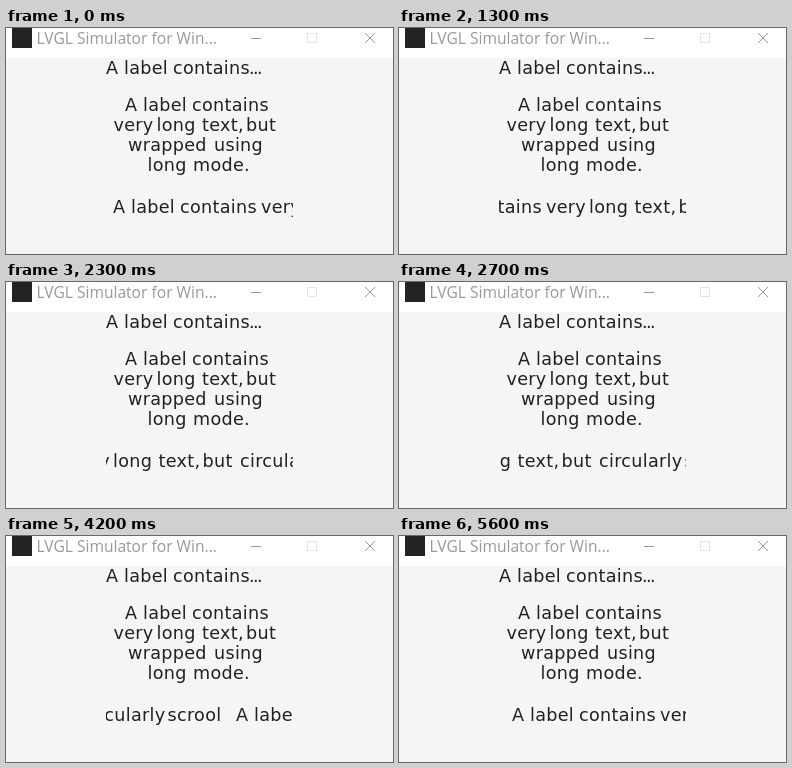
Recreate the animation shown at these times as an HTML page with a canvas. Size 387 by 226 pixels, loop 5.7 s.

```html
<!DOCTYPE html>
<html lang="en">
<head>
<meta charset="utf-8">
<title>Label modes</title>
<style>
html, body { margin: 0; width: 100%; height: 100%; overflow: hidden; background: #f5f5f5; }
canvas { display: block; width: 387px; height: 226px; }
</style>
</head>
<body>
<canvas id="stage" width="387" height="226"></canvas>
<script>
const ctx = document.getElementById('stage').getContext('2d');
const LOOP = 5700, STEP = 100;
const SPEED = 0.0832;  // px per ms
const PERIOD = 472;    // text length including the gap
const INK = '#212121', GREY = '#999';

const intro = [['A', 0], ['label', 19], ['contains', 67]];
const middle = [['very', 0], ['long', 44], ['text,', 88.5], ['but', 133.5]];
const ticker = [
  ...intro,
  ...middle.map(([word, x]) => [word, x + 148]),
  ['circularly', 318], ['scrool', 403.5]
];

// Places a word by the left edge of its ink.
function word(text, x, y) {
  ctx.fillText(text, x + ctx.measureText(text).actualBoundingBoxLeft, y);
}

function line(words, x, y) {
  for (const [text, dx] of words) word(text, x + dx, y);
}

function stroke(color, points) {
  ctx.strokeStyle = color;
  ctx.beginPath();
  for (const [x1, y1, x2, y2] of points) {
    ctx.moveTo(x1, y1);
    ctx.lineTo(x2, y2);
  }
  ctx.stroke();
}

function titleBar() {
  ctx.fillStyle = '#fff';
  ctx.fillRect(0, 0, 387, 30);
  ctx.fillStyle = '#252222';
  ctx.fillRect(6, 0, 20, 20);

  ctx.font = '15.6px "Open Sans", "Noto Sans", sans-serif';
  ctx.letterSpacing = '0px';
  ctx.fillStyle = GREY;
  ctx.fillText('LVGL Simulator for Win...', 30.5, 16);

  ctx.lineWidth = 1;
  stroke(GREY, [[245, 10.5, 255, 10.5]]);
  ctx.strokeStyle = '#e4e4e4';
  ctx.strokeRect(301.5, 5.5, 9, 9);
  stroke(GREY, [[359, 5, 369, 15], [369, 5, 359, 15]]);
}

function labels(shift) {
  ctx.font = '17.6px "DejaVu Sans", sans-serif';
  ctx.fillStyle = INK;
  ctx.letterSpacing = '-1.6px';
  word('...', 244, 46);

  ctx.letterSpacing = '0.3px';
  line(intro, 100, 46);
  line(intro, 119, 83);
  line(middle, 107.5, 103);
  line([['wrapped', 0], ['using', 87]], 122, 123);
  line([['long', 0], ['mode.', 45.5]], 142.5, 143);

  ctx.save();
  ctx.beginPath();
  ctx.rect(100, 165, 187, 30);
  ctx.clip();
  const x = 107 - Math.round(shift);
  line(ticker, x, 185);
  line(ticker, x + PERIOD, 185);
  ctx.restore();
}

function draw(now) {
  const t = Math.floor((now % LOOP) / STEP) * STEP;
  ctx.fillStyle = '#f5f5f5';
  ctx.fillRect(0, 0, 387, 226);
  titleBar();
  labels(t * SPEED);
}

let start;
function tick(now) {
  start ??= now;
  draw(now - start);
  requestAnimationFrame(tick);
}
draw(0);
requestAnimationFrame(tick);
</script>
</body>
</html>
```
